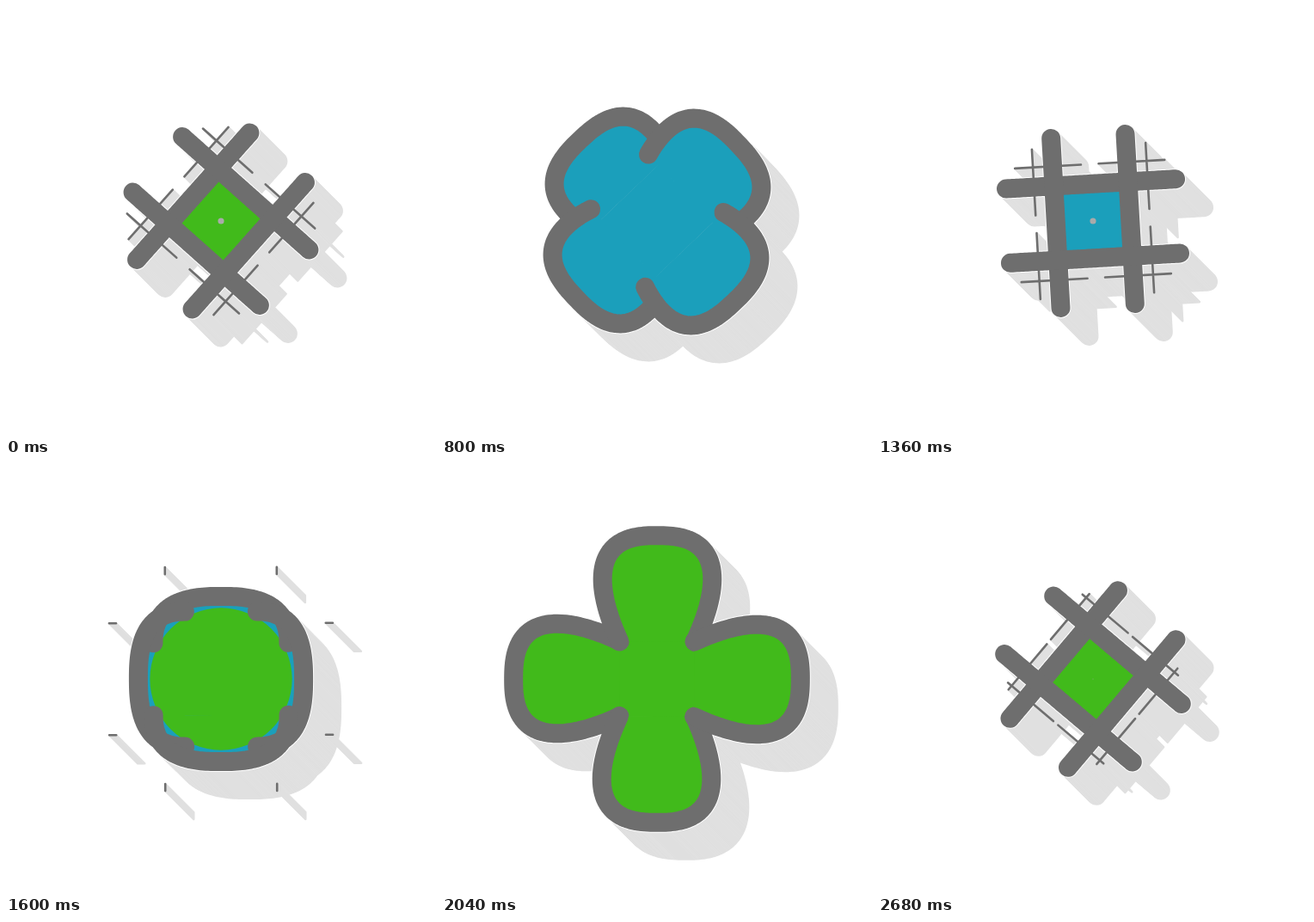
An HTML page with a canvas that plays this animation: 500 px wide and 500 px high, repeating every 2.72 s.

```html
<!DOCTYPE html>
<html>
<head>
<meta charset="utf-8">
<style>
  html, body { margin: 0; height: 100%; overflow: hidden; background: #fff; }
  canvas { display: block; width: 500px; height: 500px; }
</style>
</head>
<body>
<canvas id="stage" width="500" height="500"></canvas>
<script>
const ctx = document.getElementById('stage').getContext('2d');
const HALF = 1360, START = 580;
const BLUE = '#1b9fbb', GREEN = '#41ba1b', GRAY = '#6e6e6e', SHADOW = '#e0e0e0';
const SIDES = [180, 270, 90, 0];

const progress = (p, start, length) => Math.min(1, Math.max(0, (p - start) / length));
const easeInOut = (x, g) => x < .5 ? (2 * x) ** g / 2 : 1 - (2 - 2 * x) ** g / 2;
const sine = x => (1 - Math.cos(Math.PI * x)) / 2;
const bump = (p, center, width, g) => Math.exp(-((Math.abs(p - center) / width) ** g));

// One side: a straight bar when bloom is 0, a petal when it is 1.
function sidePath(bloom, reach, offset) {
  const path = new Path2D();
  for (let i = -40; i <= 40; i++) {
    const u = i / 40;
    const x = u * (reach + 95.5 * bloom * (1 - u * u));
    const y = offset + 127 * bloom * (1 - Math.abs(u) ** 2.5);
    path.lineTo(x, -y);
  }
  return path;
}

function rayPath(from, to, offset) {
  const path = new Path2D();
  if (to - from < .5) return path;
  for (const s of [-1, 1]) {
    path.moveTo(s * from, -offset);
    path.lineTo(s * to, -offset);
  }
  return path;
}

function turned(path, degrees) {
  const result = new Path2D();
  result.addPath(path, new DOMMatrix().rotate(degrees));
  return result;
}

function stroke(path, width, color) {
  ctx.lineWidth = width;
  ctx.strokeStyle = color;
  ctx.stroke(path);
}

function fill(path, color) {
  ctx.fillStyle = color;
  ctx.fill(path);
}

function draw(time) {
  const t = (time - START + 2 * HALF) % (2 * HALF);
  const half = Math.floor(t / HALF);
  const p = t % HALF + START;
  const [color, next] = half ? [GREEN, BLUE] : [BLUE, GREEN];

  const bloom = p < 1300
    ? 1 - easeInOut(progress(p, 590, 480), 3)
    : easeInOut(progress(p, 1364, 500), 3);
  const bar = 107 - 13 * bump(p, 1160, 300, 2);
  const reach = 42 + (bar - 42) * (1 - bloom);
  const offset = 42 + 5.3 * bump(p, 1020, 310, 4);
  const angle = 45 * (1 - half) + 45 * easeInOut(progress(p, 440, HALF), 4.4);
  const head = 130 * sine(progress(p, 1025, 550));
  const tail = 130 * easeInOut(progress(p, 1226, 500), 3);
  const spot = p > 1298 ? .0009 * (p - 1298) ** 2 : 0;

  const side = sidePath(bloom, reach, offset);
  const ray = rayPath(tail, head, offset + 23);
  const sides = SIDES.map(a => turned(side, a + 90 + angle));
  const rays = new Path2D(), body = new Path2D(), square = new Path2D();
  square.rect(-offset, -offset, 2 * offset, 2 * offset);
  body.addPath(turned(square, angle));
  sides.forEach(s => body.addPath(s));
  SIDES.forEach(a => rays.addPath(turned(ray, a + angle)));

  ctx.setTransform(1, 0, 0, 1, 0, 0);
  ctx.clearRect(0, 0, 500, 500);
  ctx.lineCap = ctx.lineJoin = 'round';

  for (let d = 33; d > 0; d--) {
    ctx.setTransform(1, 0, 0, 1, 250 + d, 250 + d);
    fill(body, SHADOW);
    stroke(rays, 2.6, SHADOW);
    sides.forEach(s => stroke(s, 22, SHADOW));
  }

  ctx.setTransform(1, 0, 0, 1, 250, 250);
  // A thin white rim parts the shape from its shadow.
  sides.forEach(s => stroke(s, 24, '#fff'));
  stroke(rays, 2.6, GRAY);
  if (p > 1300 && p < 1715) {
    // The next colour spreads from the middle.
    fill(body, color);
    ctx.save();
    ctx.clip(body);
    const disc = new Path2D();
    disc.arc(0, 0, spot, 0, 2 * Math.PI);
    fill(disc, spot < 6 ? '#aaa' : next);
    ctx.restore();
    sides.forEach(s => stroke(s, 22, GRAY));
  } else {
    const current = p < 1300 ? color : next;
    fill(body, current);
    sides.forEach(s => {
      fill(s, current);
      stroke(s, 22, GRAY);
    });
  }
}

function tick() {
  draw(performance.now() % (2 * HALF));
  requestAnimationFrame(tick);
}
tick();
</script>
</body>
</html>
```
